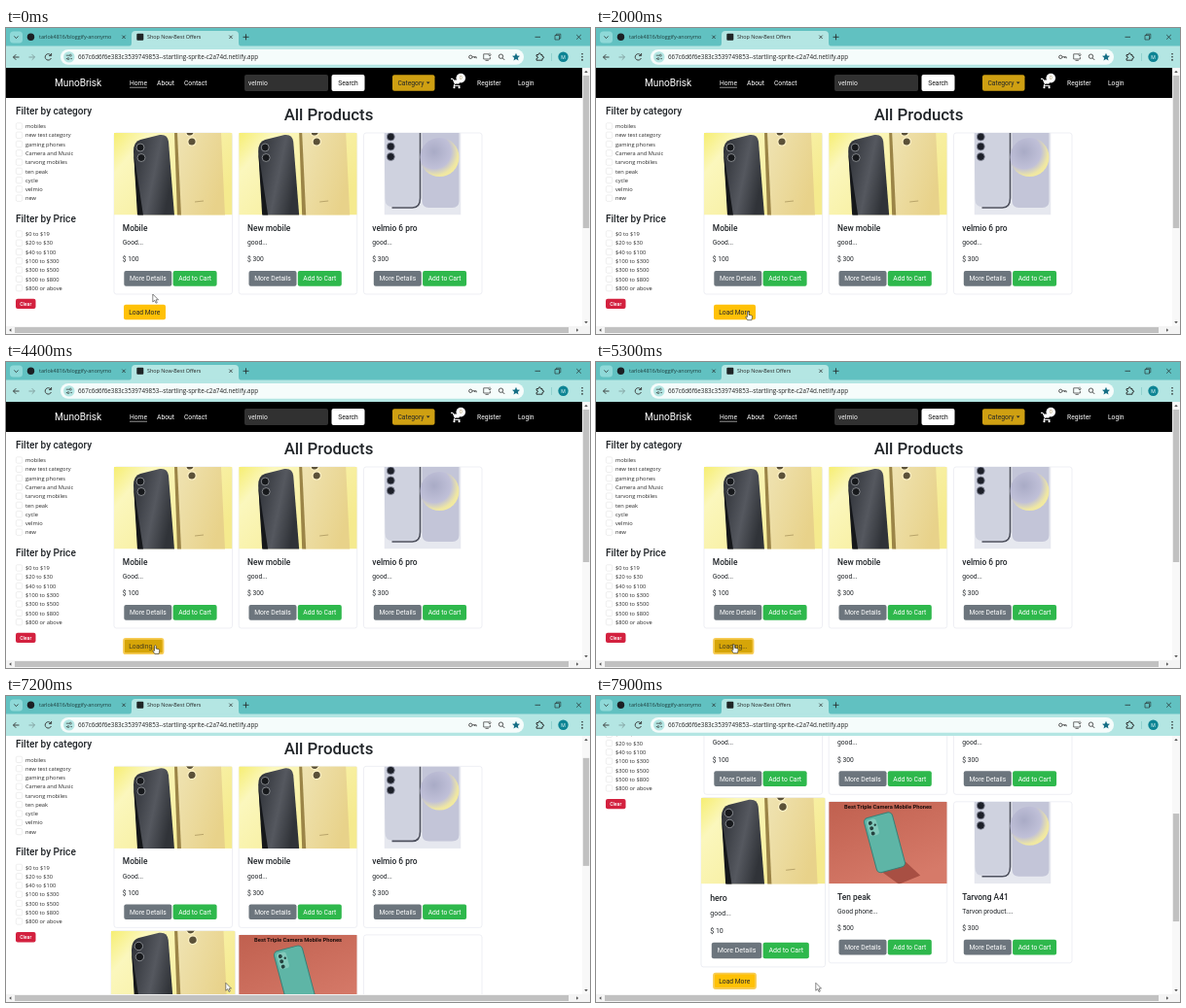
Recreate the animation shown at these times as an HTML page. Size 600 by 315 pixels, loop 8000 ms.

```html
<!DOCTYPE html>
<html lang="en">
<head>
<meta charset="utf-8">
<title>Shop page</title>
<style>
  html, body { margin: 0; width: 100%; height: 100%; overflow: hidden; background: #fff; }
  #stage { display: block; width: 100vw; height: 100vh; }
  text { font-family: Roboto, sans-serif; white-space: pre; }
  .ui { font-family: "Open Sans", sans-serif; }
</style>
</head>
<body>
<svg id="stage" viewBox="0 0 600 315">
  <defs>
    <clipPath id="view"><rect y="41" width="592" height="266"/></clipPath>
    <linearGradient id="sun" x2="1" y2=".6">
      <stop offset="0" stop-color="#f6ee72"/><stop offset=".22" stop-color="#fbf7bd"/><stop offset="1" stop-color="#f5ea8e"/>
    </linearGradient>
    <linearGradient id="dark" x2="1" y2=".4">
      <stop offset="0" stop-color="#2b2e34"/><stop offset=".6" stop-color="#55585f"/><stop offset="1" stop-color="#303338"/>
    </linearGradient>
    <linearGradient id="gold" x2="1" y2=".5">
      <stop offset="0" stop-color="#efe3b2"/><stop offset="1" stop-color="#e8d28a"/>
    </linearGradient>
    <radialGradient id="lilac" cx=".36" cy=".36" r=".72">
      <stop offset="0" stop-color="#a9abc6"/><stop offset=".6" stop-color="#c0c0d8"/><stop offset=".85" stop-color="#eee6a4"/><stop offset="1" stop-color="#f4ec9c"/>
    </radialGradient>
    <linearGradient id="clay" x2=".6" y2="1">
      <stop offset="0" stop-color="#c0604f"/><stop offset="1" stop-color="#d67a69"/>
    </linearGradient>
    <symbol id="duo" viewBox="0 0 121.5 84.5">
      <rect width="121.5" height="84.5" fill="url(#sun)"/>
      <path d="M20 19Q20 9 27 7L47 2Q55 1 56 9L62 85H25Z" fill="url(#dark)"/>
      <path d="M20 19L30 85H24Z" fill="#15171a"/>
      <path d="M65 0H110L114 85H68Z" fill="url(#gold)"/>
      <path d="M62 0H65L69 85H65Z" fill="#9b8447"/>
      <g fill="#17191c" stroke="#8c8f94" stroke-width=".9">
        <circle cx="27" cy="15" r="4"/><circle cx="28" cy="25.5" r="4"/>
      </g>
      <g fill="#5b5138" stroke="#fff4c9" stroke-width="1.2">
        <circle cx="80" cy="9" r="4.2"/><circle cx="78" cy="-1" r="4.2"/>
      </g>
      <path d="M83 71L92 70" stroke="#b9a56a" stroke-width="1"/>
    </symbol>
    <symbol id="pale" viewBox="0 0 79 84.5">
      <rect width="79" height="84.5" fill="#e6e8ef"/>
      <path d="M0 0H36V66Q36 76 28 76H8Q1 76 1 68Z" fill="#cfd2df"/>
      <path d="M37 0V67Q37 77 29 77H8" fill="none" stroke="#4d505e" stroke-width="1.6"/>
      <path d="M39 0H77V70Q77 77 70 77H46Q39 77 39 70Z" fill="#c3c5d8"/>
      <circle cx="57" cy="25" r="20" fill="url(#lilac)"/>
      <g fill="#1d2029" stroke="#8d91a3" stroke-width=".8">
        <circle cx="6.8" cy="4" r="4"/><circle cx="6.8" cy="14" r="4"/><circle cx="6.8" cy="24.5" r="4"/>
      </g>
    </symbol>
    <symbol id="teal" viewBox="0 0 121.5 84.5">
      <rect width="121.5" height="84.5" fill="url(#clay)"/>
      <path d="M54 72L79 62L94 76L72 85Z" fill="#a84f43"/>
      <g transform="rotate(-15 57 41)">
        <rect x="42" y="13" width="30" height="58" rx="4.5" fill="#5eb5a6" stroke="#397f76" stroke-width="1"/>
        <rect x="44.5" y="15.5" width="10" height="17" rx="3" fill="#82c9bb"/>
        <g fill="#25423f"><circle cx="48" cy="19" r="2"/><circle cx="48" cy="24.5" r="2"/><circle cx="48" cy="30" r="2"/><circle cx="52.3" cy="22" r="1.2"/></g>
      </g>
      <text x="60.9" y="7.4" font-size="5.8" font-weight="700" text-anchor="middle" fill="#1b0d0b">Best Triple Camera Mobile Phones</text>
    </symbol>
  </defs>
  <rect width="600" height="315" fill="#fff"/>
  <g clip-path="url(#view)"><g id="page"></g></g>
  <g id="chrome"></g>
  <g id="arrow">
    <path d="M0 0V8L1.9 6.3L3.2 9.2L4.5 8.6L3.2 5.8H5.7Z" fill="#fff" stroke="#333" stroke-width=".6"/>
  </g>
  <g id="hand">
    <path d="M-.8 .7Q0-.5 .8 .7V3.6L3.6 4.2Q4.5 4.5 4.4 5.5L3.7 9H-.5L-2.4 6Q-2.4 4.9-.8 5.8Z" fill="#fff" stroke="#222" stroke-width=".6"/>
  </g>
</svg>
<script>
const $ = id => document.getElementById(id);
const INK = '#212529';
const BASE = 6.72;
const BAR = '#b4e6e3';

const text = (x, y, s, size = BASE, fill = INK, extra = '') =>
  `<text x="${x}" y="${y}" font-size="${size}" fill="${fill}" ${extra}>${s}</text>`;
const ui = (x, y, s, size, fill = '#333') => text(x, y, s, size, fill, 'class="ui"');
const box = (x, y, w, h, fill, r = 0, extra = '') =>
  `<rect x="${x}" y="${y}" width="${w}" height="${h}" rx="${r}" fill="${fill}" ${extra}/>`;
const dot = (x, y, r, fill, extra = '') => `<circle cx="${x}" cy="${y}" r="${r}" fill="${fill}" ${extra}/>`;
const line = (d, color = '#333', w = .8, fill = 'none') =>
  `<path d="${d}" fill="${fill}" stroke="${color}" stroke-width="${w}"/>`;
const button = (x, y, w, h, fill, label, color = '#fff') =>
  box(x, y, w, h, fill, 2) +
  text(x + w / 2, y + h / 2 + 2.4, label, BASE, color, 'text-anchor="middle"');

function card(x, y, [pic, name, note, price], id = '') {
  const narrow = pic === 'pale';
  const w = narrow ? 79 : 121.5;
  return `<g id="${id}">` +
    box(x, y, 121.5, 166, '#fff', 2.5, 'stroke="#e3e4ec" stroke-width=".6"') +
    `<use class="pic" href="#${pic}" x="${x + (narrow ? 21 : 0)}" y="${y}" width="${w}" height="84.5"/>` +
    text(x + 8.8, y + 101, name, 8.4, INK, 'font-weight="500"') +
    text(x + 8.8, y + 115.2, note) +
    text(x + 8.8, y + 132.4, '$ ' + price) +
    button(x + 10.3, y + 142, 49, 15.7, '#6c757d', 'More Details') +
    button(x + 60.6, y + 142, 45, 15.7, '#2eb84c', 'Add to Cart') + '</g>';
}

const checks = (y, labels) => labels.map((s, i) => {
  const cy = y + i * 9.27;
  return box(10.3, cy - 3.2, 6.4, 6.4, '#fff', 1.5, 'stroke="#dcdcdc" stroke-width=".5"') +
    ui(20, cy + 2.2, s, 5.7, '#2b2b2b');
}).join('');

const navbar = () =>
  box(0, 41, 592, 31, '#000') +
  text(50, 60, 'MunoBrisk', 10.1, '#fff') +
  text(127, 59, 'Home', BASE, '#fff') + line('M127 61.2H145', '#fff', .6) +
  text(155, 59, 'About', BASE, '#fff') + text(183, 59, 'Contact', BASE, '#fff') +
  box(245, 48, 86, 17, '#313131', 2) + text(249, 59, 'velmio', BASE, '#f2f2f2') +
  button(334.5, 48, 34, 17, '#fff', 'Search', '#111') +
  box(397, 48.3, 43.5, 16.4, '#cfa012', 2) + text(402.5, 59, 'Category') +
  '<path d="M431.8 55.5H435.6L433.7 57.5Z" fill="#212529"/>' +
  '<path d="M457 52.3H459L461.2 57.6H465.4L467.2 53.6H460Z" fill="#fff"/>' +
  line('M457 52.3H459L461.2 57.6L460 59.4H466.5', '#fff', 1) +
  dot(460.5, 61.2, 1.1, '#fff') + dot(465.6, 61.2, 1.1, '#fff') +
  dot(467.3, 51.6, 4.8, '#fff') + text(467.3, 53.3, '0', 4.8, '#a08a50', 'text-anchor="middle"') +
  text(484, 59, 'Register', BASE, '#fff') + text(526, 59, 'Login', BASE, '#fff');

const sidebar = () =>
  text(10, 88.8, 'Filter by category', 10.08, INK, 'font-weight="500"') +
  checks(101, ['mobiles', 'new test category', 'gaming phones', 'Camera and Music',
    'tarvong mobiles', 'ten peak', 'cycle', 'velmio', 'new']) +
  text(10, 199.7, 'Filter by Price', 10.08, INK, 'font-weight="500"') +
  checks(212, ['$0 to $19', '$20 to $30', '$40 to $100', '$100 to $300',
    '$300 to $500', '$500 to $800', '$800 or above']) +
  box(10, 278.7, 20.5, 10.3, '#d3213f', 2) +
  text(20.2, 285.8, 'Clear', 5.2, '#fff', 'text-anchor="middle" font-weight="500"');

const columns = [111, 239.2, 367.5];
const rowOne = [
  ['duo', 'Mobile', 'Good...', 100],
  ['duo', 'New mobile', 'good...', 300],
  ['pale', 'velmio 6 pro', 'good...', 300]];
const rowTwo = [
  ['duo', 'hero', 'good...', 10],
  ['teal', 'Ten peak', 'Good phone...', 500],
  ['pale', 'Tarvong A41', 'Tarvon product....', 300]];

$('page').innerHTML = navbar() + sidebar() +
  text(331.5, 95.2, 'All Products', 16.8, INK, 'text-anchor="middle" font-weight="500"') +
  rowOne.map((p, i) => card(columns[i], 108, p, 'top' + i)).join('') +
  '<g id="rowTwo">' +
  [1, 2, 0].map(i => card(columns[i], 281.5, rowTwo[i], 'low' + i)).join('') + '</g>' +
  '<g id="more">' + box(121, 284.8, 43, 15.4, '#ffc107', 2, 'id="moreBox"') +
  text(126.2, 294.9, '', BASE, INK, 'id="moreLabel"') + '</g>';

const cross = (x, y, r, w = .7) =>
  line(`M${x - r} ${y - r}l${2 * r} ${2 * r}m0 ${-2 * r}l${-2 * r} ${2 * r}`, '#222', w);

const tabs = () =>
  box(0, 0, 600, 20, '#61c1c1') +
  box(4, 3.5, 13, 12, '#8fd9d8', 3.5) + line('M8.4 8.5L10.5 10.6L12.6 8.5', '#222') +
  dot(25.5, 9.3, 3.7, '#1b1f23') +
  ui(34, 11.3, 'tarlok4816/bloggify-anonymo', 5.4, '#1d3a3a') +
  cross(121, 9.3, 1.7) +
  `<path d="M126 19Q129 19 129 15V7Q129 3 133 3H235Q239 3 239 7V15Q239 19 242 19Z" fill="${BAR}"/>` +
  box(134.3, 5.8, 7, 7, '#1f2526', 1) +
  ui(145, 11.3, 'Shop Now-Best Offers', 5.4, '#222') +
  cross(231, 9.3, 1.7) + line('M243.5 9.3H249.5M246.5 6.3V12.3', '#222') +
  line('M543.5 9.3H549', '#222', .7) +
  line('M564 7.5H568.5V12H564ZM565.4 7.4V6.2H569.8V10.7H568.6', '#222', .6) +
  cross(588.5, 9.3, 2.3);

const toolbar = () =>
  box(0, 18.5, 600, 22.5, BAR) +
  line('M13.5 30H7.5M10.3 27.2L7.5 30L10.3 32.8', '#333', .9) +
  line('M23.5 30H29.5M26.7 27.2L29.5 30L26.7 32.8', '#7d9a9a', .9) +
  line('M46 28A3.2 3.2 0 1 0 46.4 31M46.6 26V28.6H44', '#333', .9) +
  box(56, 22, 476, 15.8, '#f5fcfb', 7.9) + dot(64.8, 29.9, 5.7, BAR) +
  line('M61.8 28.2H65M61.8 31.6H63.2M66.4 31.6H68', '#333', .7) +
  dot(66.3, 28.2, 1, 'none', 'stroke="#333" stroke-width=".6"') +
  dot(64, 31.6, 1, 'none', 'stroke="#333" stroke-width=".6"') +
  ui(74, 32.1, '667c6d6f6e383c3539749853--startling-sprite-c2a74d.netlify.app', 6.25, '#222') +
  dot(477.3, 29.8, 1.7, 'none', 'stroke="#333" stroke-width=".8"') + line('M479 29.8H483.2V31.3M481.6 29.8V31', '#333', .8) +
  line('M496 26.8H490.7V32H497.4V29.8M492.5 33.4H495.8M497 25.7V28.7M495.6 27.4L497 28.8L498.4 27.4', '#333', .7) +
  dot(508.5, 29.2, 2.2, 'none', 'stroke="#333" stroke-width=".8"') + line('M510.2 30.9L512.2 32.9', '#333', .9) +
  '<path d="M524 25.8L525.2 28.5L528 28.8L525.9 30.7L526.5 33.6L524 32.1L521.5 33.6L522.1 30.7L520 28.8L522.8 28.5Z" fill="#176f86"/>' +
  line('M545 27.6H547Q547 25.8 548.2 25.8T549.4 27.6H551V29.2Q552.6 29.2 552.6 30.3T551 31.4V33.2H545V31.4Q546.6 31.2 546.6 30.3T545 29.2Z', '#222', .9) +
  line('M560.5 26V34', '#7cc4c2', .6) +
  dot(572.5, 29.8, 5.2, '#0d8494') + text(572.5, 31.7, 'M', 5.2, '#d9f3f3', 'text-anchor="middle"') +
  [26.7, 29.8, 32.9].map(y => dot(592, y, .8, '#222')).join('');

const scrollbars = () =>
  box(592, 41, 8, 266, '#f8f8f8') + box(592.8, 49, 6.4, 157, '#c1c1c1', 0, 'id="thumb"') +
  '<path d="M594.2 46L596 43.8L597.8 46ZM594.2 302L596 304.2L597.8 302Z" fill="#555"/>' +
  box(0, 307, 600, 8, '#f4f4f4') + box(9, 308, 569, 6, '#c1c1c1') +
  '<path d="M5.4 309.2L3.2 311L5.4 312.8ZM586 309.2L588.2 311L586 312.8Z" fill="#555"/>';

$('chrome').innerHTML = tabs() + toolbar() + scrollbars();
const latePic = document.querySelector('#low2 .pic');

const LOOP = 8000, STEP = 100;
const CLICK = 3900, LOADED = 6700, LAST_PIC = 7300;
// Each step: time, then values reached at that time.
const cursorPath = [[0, 150.8, 274], [400, 150.8, 274], [1200, 156.2, 291.7], [4200, 156.2, 291.7],
  [4900, 141.8, 290.7], [5500, 141.8, 290.7], [6200, 225.8, 295.3], [LOOP, 225.8, 295.3]];
const scrollPath = [[0, 0], [7000, 0], [7200, 35.6], [7900, 172.7], [LOOP, 172.7]];
const growPath = [[0, 1], [LOADED, 1], [LOADED + 300, 1.05], [LOOP, 1.05]];

const smooth = k => k * k * (3 - 2 * k);
const linear = k => k;
function at(path, t, ease = smooth) {
  const i = path.findIndex(p => p[0] > t);
  const a = path[i - 1], b = path[i];
  const k = ease((t - a[0]) / (b[0] - a[0]));
  return a.slice(1).map((v, n) => v + (b[n + 1] - v) * k);
}
const set = (id, attrs) => {
  for (const key in attrs) $(id).setAttribute(key, attrs[key]);
};

function draw(t) {
  const [x, y] = at(cursorPath, t);
  const [scroll] = at(scrollPath, t, linear);
  const [grow] = at(growPath, t);
  const clicked = t >= CLICK, loaded = t >= LOADED, loading = clicked && !loaded;
  const width = loading ? 40.5 : 43;
  const over = !loaded && x > 121 && x < 121 + width && y > 284.8 && y < 300;

  set('page', { transform: `translate(0 ${-scroll})` });
  set('rowTwo', { display: loaded ? 'inline' : 'none' });
  latePic.setAttribute('display', t >= LAST_PIC ? 'inline' : 'none');
  set('low0', { transform: `translate(171.75 364.5) scale(${grow}) translate(-171.75 -364.5)` });
  set('more', { transform: `translate(0 ${loaded ? 173.5 : 0})` });
  set('moreBox', {
    width,
    fill: loading && over ? '#d6a508' : '#ffc107',
    stroke: clicked ? '#f7cc55' : 'none',
    'stroke-width': 1.8
  });
  $('moreLabel').textContent = loading ? 'Loading...' : 'Load More';
  set('moreLabel', { fill: loading ? '#4a3f1c' : INK });
  set('thumb', { y: 49 + scroll * 250 / 599, height: loaded ? 111 : 157 });
  for (const [id, on] of [['hand', over], ['arrow', !over]])
    set(id, { transform: `translate(${x} ${y})`, visibility: on ? 'visible' : 'hidden' });
}

function tick() {
  draw(Math.floor(performance.now() % LOOP / STEP) * STEP);
  requestAnimationFrame(tick);
}
tick();
</script>
</body>
</html>
```
